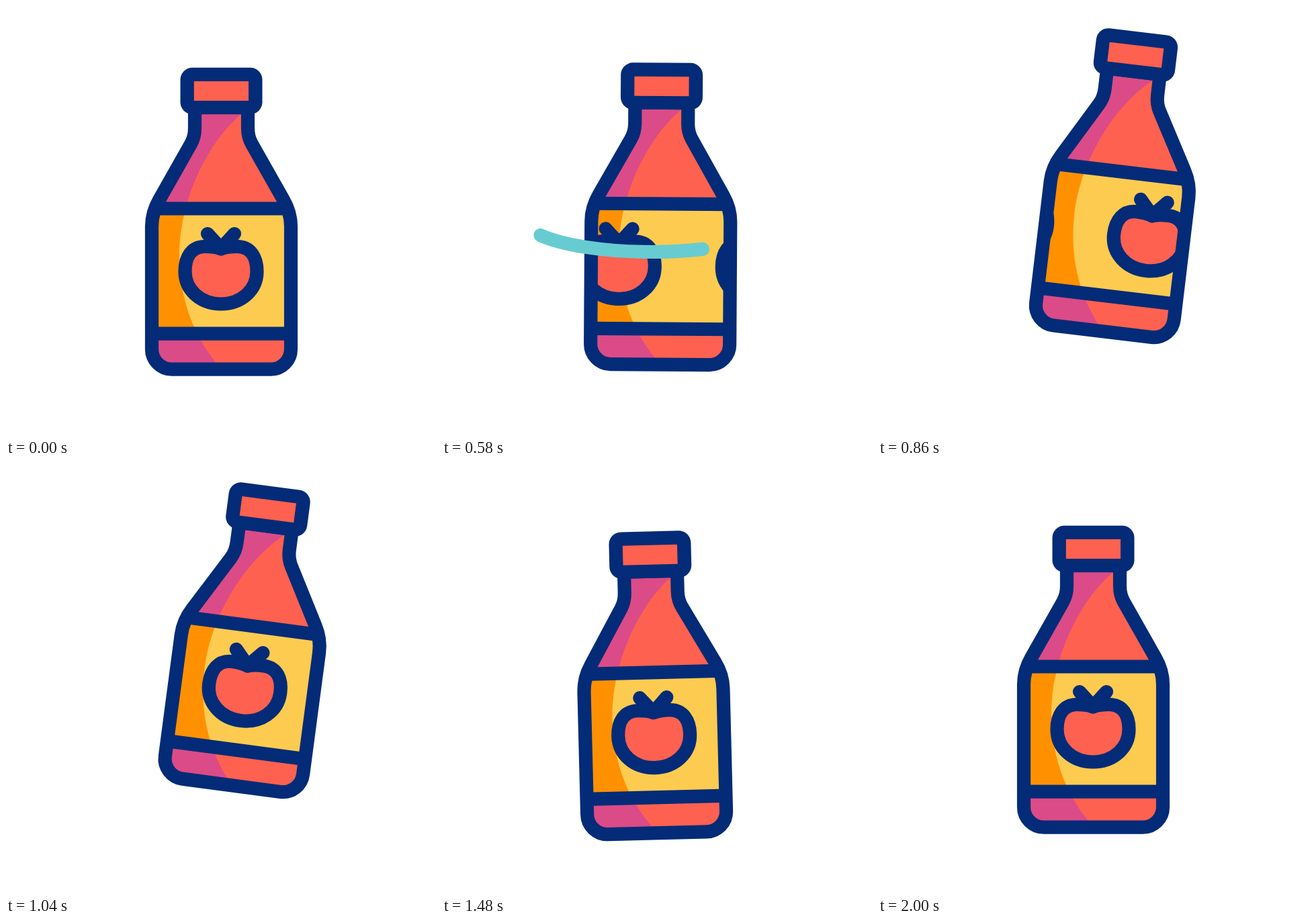
An HTML page with a canvas that plays this animation: 640x640 px, repeating every 2.32 s.

```html
<!DOCTYPE html>
<html lang="en">
<head>
<meta charset="utf-8">
<title>Ketchup bottle</title>
<style>
html, body { margin: 0; width: 100%; height: 100%; overflow: hidden; background: #fff; }
canvas { display: block; width: 640px; height: 640px; }
</style>
</head>
<body>
<canvas id="stage"></canvas>
<script>
const LOOP = 2320, CX = 320.5, CY = 321.5, LINE = 20.2, SPACING = 207;
const NAVY = '#042b77', RED = '#ff6150', PINK = '#db4b87',
      YELLOW = '#fdcb50', ORANGE = '#ff9100', TEAL = '#67ccd1';

const canvas = document.getElementById('stage');
const ctx = canvas.getContext('2d');
const dpr = window.devicePixelRatio || 1;
canvas.width = canvas.height = 640 * dpr;

// Monotone cubic track through [time, value] points, flat at every extreme.
function track(pts) {
  const sec = pts.slice(1).map((p, i) => (p[1] - pts[i][1]) / (p[0] - pts[i][0]));
  const slope = pts.map((p, i) => {
    const a = sec[i - 1], b = sec[i];
    return a * b > 0 ? 2 * a * b / (a + b) : 0;
  });
  return t => {
    const last = pts.length - 1;
    if (t <= pts[0][0]) return pts[0][1];
    if (t >= pts[last][0]) return pts[last][1];
    let i = 0;
    while (t > pts[i + 1][0]) i++;
    const h = pts[i + 1][0] - pts[i][0], u = (t - pts[i][0]) / h, v = 1 - u;
    return v * v * (1 + 2 * u) * pts[i][1] + u * u * (3 - 2 * u) * pts[i + 1][1]
      + h * u * v * (v * slope[i] - u * slope[i + 1]);
  };
}

const moveX = track([[200, 0], [468, -7.7], [720, 30.5], [800, 37.6], [1040, 43.8],
  [1180, 45], [1320, 14], [1425, -7.5], [1690, 8], [2000, 0]]);
const moveY = track([[200, 0], [468, 12], [720, -43], [800, -52], [1040, -60.5],
  [1180, -62.5], [1418, 12], [1690, -12.6], [2000, 0]]);
const tilt = track([[200, 0], [468, -2], [720, 5], [800, 6.4], [1040, 7.55],
  [1180, 7.8], [1418, -2], [1690, 2], [2000, 0]]);
const scroll = track([[200, 0], [420, -24.4], [720, -102.5], [1040, -205.8],
  [1190, -217], [1320, -213.5], [1520, -SPACING]]);
const head = track([[400, 0], [700, 1]]);
const tail = track([[500, 0], [820, 1]]);

const body = new Path2D(`M281 151V182Q281 195 275 205.5L228 288.5Q217 307.5 217 328
  V510.5A30 30 0 0 0 247 540.7H394A30 30 0 0 0 424 510.5V328
  Q424 307.5 413 288.5L366 205.5Q360 195 360 182V151Z`);
const shade = new Path2D(`M350 161C300 203 258 290 258 370
  C258 428 274 483 313 531L320 560H190V140H370Z`);
const bands = new Path2D('M217 301.5H424M217 487.7H424');
const fruit = new Path2D(`M320 361.5C311 358 300 358 296 358C276 358 266.5 374 266.5 395
  C266.5 423 290 443.5 320 443.5C350 443.5 373.5 423 373.5 395
  C373.5 374 364 358 344 358C340 358 329 358 320 361.5Z`);
const leaves = new Path2D('M300 339L320 361L340 339');

const swoosh = { x: 312, y: 315, rx: 193, ry: 51, from: 3.676, to: -0.534 };
swoosh.length = (() => {
  const n = 400, step = (swoosh.from - swoosh.to) / n;
  let sum = 0;
  for (let i = 0; i < n; i++) {
    const a = swoosh.from - (i + 0.5) * step;
    sum += Math.hypot(swoosh.rx * Math.sin(a), swoosh.ry * Math.cos(a)) * step;
  }
  return sum;
})();

function fill(path, color) {
  ctx.fillStyle = color;
  ctx.fill(path);
}

function stroke(path, color = NAVY) {
  ctx.strokeStyle = color;
  ctx.stroke(path);
}

function drawTomato(x) {
  ctx.save();
  ctx.translate(x, 0);
  fill(fruit, RED);
  stroke(fruit);
  stroke(leaves);
  ctx.restore();
}

function drawBottle(t) {
  ctx.save();
  ctx.translate(CX + moveX(t), CY + moveY(t));
  ctx.rotate(tilt(t) * Math.PI / 180);
  ctx.translate(-CX, -CY);

  ctx.save();
  ctx.clip(body);
  fill(body, RED);
  fill(shade, PINK);
  ctx.save();
  ctx.beginPath();
  ctx.rect(200, 301.5, 240, 186.2);
  ctx.clip();
  fill(body, YELLOW);
  fill(shade, ORANGE);
  const x = scroll(t);
  drawTomato(x);
  drawTomato(x + SPACING);
  ctx.restore();
  stroke(bands);
  ctx.restore();

  stroke(body);
  ctx.beginPath();
  ctx.roundRect(259.5, 91.7, 122, 69.5, 18);
  ctx.fillStyle = NAVY;
  ctx.fill();
  ctx.fillStyle = RED;
  ctx.fillRect(279.8, 112, 81.2, 29);
  ctx.restore();
}

function drawSwoosh(t) {
  const a = tail(t), b = head(t), s = swoosh;
  if (b <= a) return;
  ctx.save();
  ctx.setLineDash([(b - a) * s.length, s.length * 3]);
  ctx.lineDashOffset = -a * s.length;
  ctx.strokeStyle = TEAL;
  ctx.beginPath();
  ctx.ellipse(s.x, s.y, s.rx, s.ry, 0, s.from, s.to, true);
  ctx.stroke();
  ctx.restore();
}

function draw(t) {
  ctx.setTransform(dpr, 0, 0, dpr, 0, 0);
  ctx.fillStyle = '#fff';
  ctx.fillRect(0, 0, 640, 640);
  ctx.lineWidth = LINE;
  ctx.lineCap = ctx.lineJoin = 'round';
  drawBottle(t);
  drawSwoosh(t);
}

const start = performance.now();
function tick() {
  draw((performance.now() - start) % LOOP);
  requestAnimationFrame(tick);
}
tick();
</script>
</body>
</html>
```
